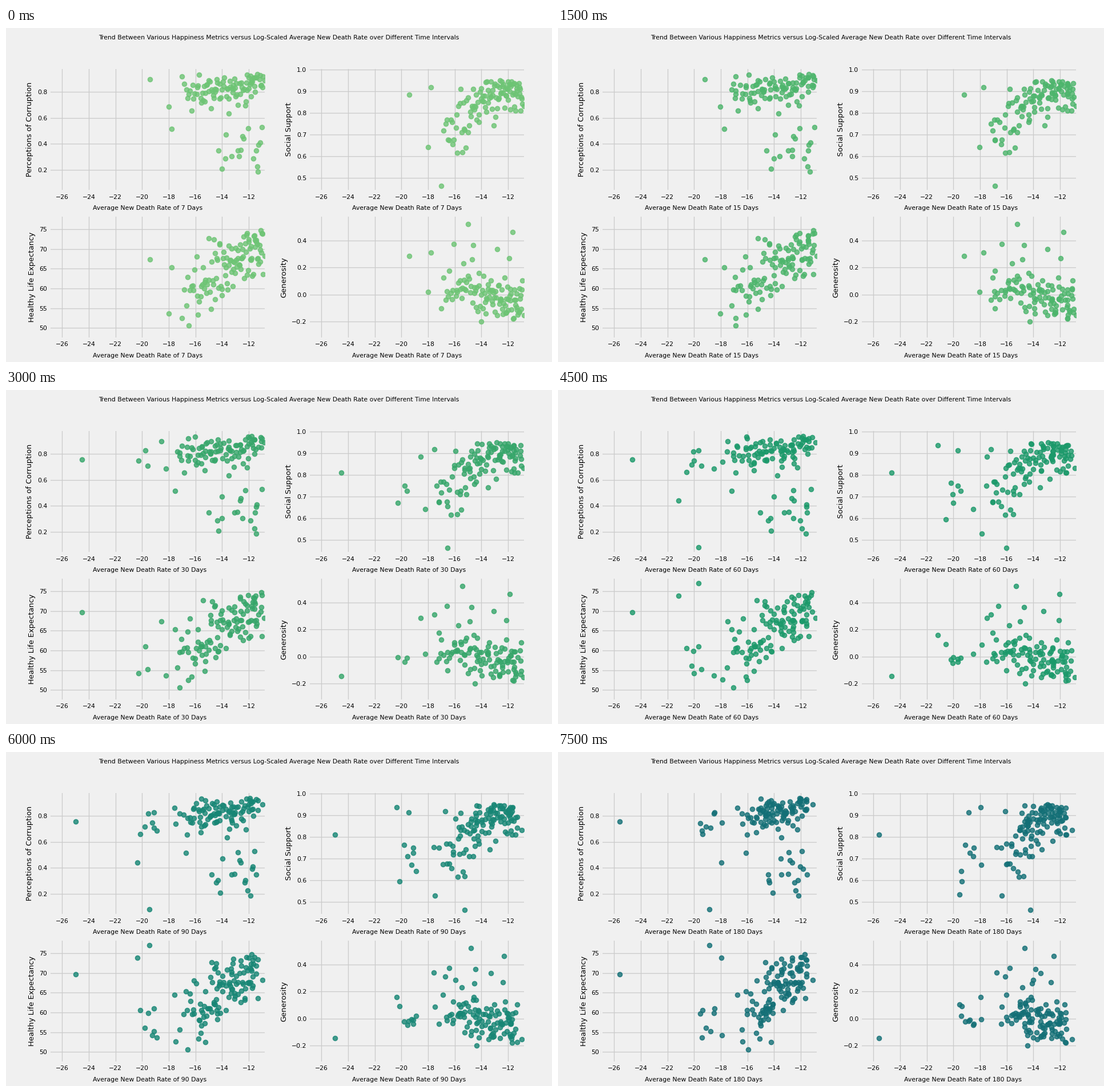
A matplotlib script for the animation above (8 s loop, 956 by 586 pixels).

```python
import numpy as np
import matplotlib.pyplot as plt
from matplotlib.animation import FuncAnimation

W, H, DPI = 956, 586, 64
PX = 72 / DPI                      # points per pixel
BG, GRID = "#f0f0f0", "#cbcbcb"
DAYS = [7, 15, 30, 60, 90, 180]
COLORS = ["#6dc474", "#4db56c", "#36a66a", "#1b996a", "#178675", "#136f76"]
TITLE = ("Trend Between Various Happiness Metrics versus Log-Scaled "
         "Average New Death Rate over Different Time Intervals")
XLIM = (-26.86, -10.81)
AX_W, AX_H = 374.5, 212
LAST = len(DAYS) - 1

# name, left, top, label x, y limits, y ticks
PANELS = [
    ("Perceptions of Corruption", 78.2, 72, 42, (0.046, 0.978), np.arange(0.2, 0.9, 0.2)),
    ("Social Support", 532.2, 72, 495, (0.4445, 1.0034), np.arange(0.5, 1.01, 0.1)),
    ("Healthy Life Expectancy", 78.2, 331, 46, (47.6, 78.17), np.arange(50, 76, 5)),
    ("Generosity", 532.2, 331, 487, (-0.318, 0.575), np.arange(-0.2, 0.5, 0.2)),
]

# Outlying countries: first interval, rate there and at the end, four metrics
OUTLIERS = [
    (0, -19.42, -14.00, .898, .886, 67.4, .285),
    (0, -17.98, -19.42, .690, .642, 53.7, .018),
    (0, -17.80, -16.10, .515, .918, 65.3, .310),
    (0, -17.00, -14.24, .922, .463, 52.5, -.105),
    (0, -10.78, -11.10, .892, .832, 68.2, -.155),
    (2, -24.50, -25.58, .757, .811, 69.7, -.147),
    (2, -20.28, -17.93, .748, .672, 54.2, -.005),
    (3, -21.15, -17.97, .440, .938, 73.9, .158),
    (3, -19.68, -18.84, .080, .915, 77.0, -.020),
]


def fold(values, bound):
    """Mirror values that pass an upper (positive) or lower bound."""
    over = values > bound if bound > 0 else values < bound
    return np.where(over, 2 * bound - values, values)


def make_crowd(count=108, late=8):
    rng = np.random.default_rng(5)
    u = (np.arange(count) + rng.random(count)) / count
    start = np.append(-17 + 6.1 * u ** .72, rng.uniform(-20, -17.3, late))
    first = np.append(np.zeros(count), rng.integers(2, 6, late))
    t = np.clip((start + 16.8) / 5, 0, 1)

    # The right side eases left; the left side swings out, then returns
    p = np.linspace(0, 1, len(DAYS))[:, None]
    swing = .8 * p ** 4 - .6 * np.sin(np.pi * p)
    drift = p * rng.normal(0, .4, start.size) + p ** .5 * rng.normal(0, .12, (len(DAYS), start.size))
    rates = start - .65 * p ** 1.5 * t + swing * (1 - t) + drift
    edge = -10.9 - .6 * p ** 2
    rates = edge - np.abs(edge - rates)

    def metric(low, high, spread, bound):
        return fold(low + (high - low) * t + rng.normal(0, spread, t.size), bound)

    def some(share):
        return rng.random(t.size) < share

    corruption = metric(.76, .84, .07, .94)
    corruption = np.where((t > .45) & some(.2), rng.uniform(.17, .6, t.size), corruption)
    support = metric(.74, .915, .055, .952) - .17 * ((t < .5) & some(.17))
    health = metric(58, 70.5, 3.7, 75)
    giving = metric(.04, -.06, .09, -.25) + .3 * some(.06)
    return rates, first, [corruption, support, health, giving]


RATES, FIRST, METRICS = make_crowd()


def points(panel, step):
    seen = FIRST <= step
    crowd = np.column_stack([RATES[step], METRICS[panel]])[seen]
    outliers = [(a + (b - a) * ((step - k) / (LAST - k)) ** 2, metrics[panel])
                for k, a, b, *metrics in OUTLIERS if step >= k]
    return np.vstack([crowd, outliers])


plt.rcParams.update({"font.family": "DejaVu Sans", "axes.axisbelow": True})
fig = plt.figure(figsize=(W / DPI, H / DPI), dpi=DPI, facecolor=BG)


def label(x, y, text, size=10.85, **kw):
    return fig.text(x / W, 1 - y / H, text, fontsize=size * PX, color="black", **kw)


def add_panel(name, left, top, label_x, ylim, yticks):
    ax = fig.add_axes([left / W, 1 - (top + AX_H) / H, AX_W / W, AX_H / H], facecolor=BG)
    ax.set(xlim=XLIM, ylim=ylim, xticks=range(-26, -11, 2), yticks=yticks)
    ax.spines[:].set_visible(False)
    ax.grid(color=GRID, linewidth=1.3 * PX)
    ax.tick_params(length=0, labelsize=10.85 * PX)
    ax.tick_params(axis="x", pad=7.5 * PX)
    ax.tick_params(axis="y", pad=6 * PX)
    dots = ax.scatter([], [], s=(8 * PX) ** 2, linewidths=1.6 * PX, alpha=.8)
    label(label_x, top + AX_H / 2, name, 13, rotation=90, ha="center", va="center")
    caption = label(left + 73.6, top + 247, "", ha="left", va="baseline")
    return dots, caption


label(W / 2, 20, TITLE, ha="center", va="baseline")
panels = [add_panel(*p) for p in PANELS]


def draw(frame):
    step = frame // 3
    for i, (dots, caption) in enumerate(panels):
        dots.set_offsets(points(i, step))
        dots.set_facecolor(COLORS[step])
        dots.set_edgecolor(COLORS[step])
        caption.set_text(f"Average New Death Rate of {DAYS[step]} Days")
    return []


anim = FuncAnimation(fig, draw, frames=16, interval=500, init_func=lambda: draw(0),
                     repeat=True, repeat_delay=0)
plt.show()
```
